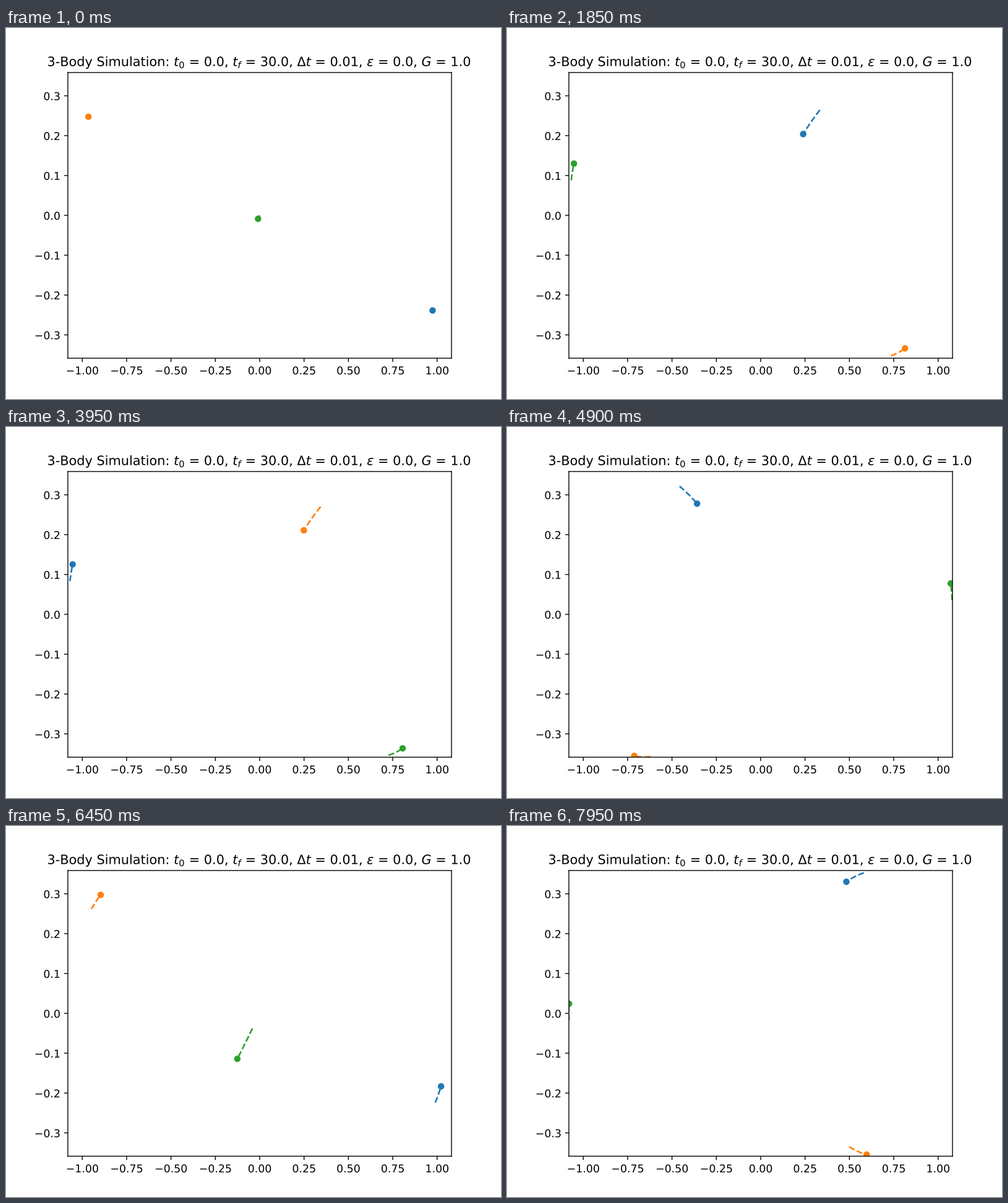
Animation of 800x600 px, one loop 8000 ms. Source, as a matplotlib script:

```python
import numpy as np
import matplotlib.pyplot as plt
from matplotlib.animation import FuncAnimation
from matplotlib.patheffects import Normal

FRAMES, INTERVAL = 160, 50
DT, STEPS_PER_FRAME, TRAIL = 0.01, 5, 9


class Subpixel(Normal):
    """Draw lines, markers and text without snapping to whole pixels."""

    def draw_path(self, renderer, gc, path, affine, face=None):
        gc.set_snap(False)
        super().draw_path(renderer, gc, path, affine, face)


plt.rcParams["font.family"] = "DejaVu Sans"
plt.rcParams["path.effects"] = [Subpixel()]


def accel(pos):
    """Pairwise gravity with unit masses and G = 1."""
    diff = pos[None] - pos[:, None]
    dist = np.linalg.norm(diff, axis=2) + np.eye(3)
    return (diff / dist[..., None] ** 3).sum(axis=1)


def simulate(steps):
    """Leapfrog integration of the figure-eight orbit."""
    start = np.array([0.97000436, -0.24308753])
    drift = np.array([0.93240737, 0.86473146]) / 2
    pos = np.array([start, -start, 0 * start])
    vel = np.array([drift, drift, -2 * drift])
    path = [pos]
    acc = accel(pos)
    for _ in range(steps):
        vel = vel + acc * DT / 2
        pos = pos + vel * DT
        acc = accel(pos)
        vel = vel + acc * DT / 2
        path.append(pos)
    return np.array(path)


path = simulate(FRAMES * STEPS_PER_FRAME)
low, high = path.min(axis=(0, 1)), path.max(axis=(0, 1))

fig, ax = plt.subplots(figsize=(6.4, 4.8), dpi=125)
ax.set_xlim(low[0], high[0])
ax.set_ylim(low[1], high[1])
ax.set_title(r"3-Body Simulation: $t_0$ = 0.0, $t_f$ = 30.0, "
             r"$\Delta t$ = 0.01, $\varepsilon$ = 0.0, $G$ = 1.0")

trails = [ax.plot([], [], "--", color=f"C{i}")[0] for i in range(3)]
dots = [ax.plot([], [], "o", color=f"C{i}", ms=5)[0] for i in range(3)]


def draw(frame):
    now = frame * STEPS_PER_FRAME + 1
    recent = path[max(0, now - TRAIL):now + 1]
    for i, (trail, dot) in enumerate(zip(trails, dots)):
        trail.set_data(recent[:, i, 0], recent[:, i, 1])
        dot.set_data(recent[-1:, i, 0], recent[-1:, i, 1])
    return trails + dots


anim = FuncAnimation(fig, draw, frames=FRAMES, interval=INTERVAL,
                     init_func=lambda: draw(0), repeat=True, repeat_delay=0)
plt.show()
```
